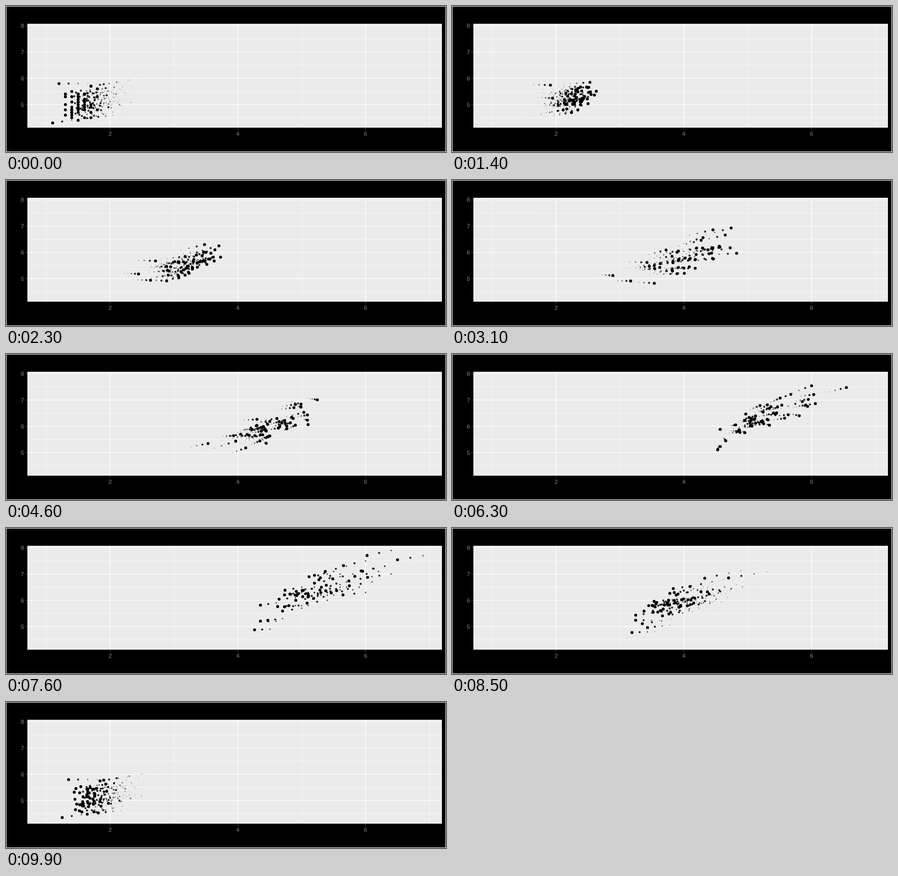
Write an HTML page with a canvas that moves like this. It is 864 by 288 pixels and loops after 10000 ms.

```html
<!DOCTYPE html>
<html lang="en">
<head>
<meta charset="utf-8">
<title>Iris states</title>
<style>
html, body { margin: 0; width: 100%; height: 100%; overflow: hidden; background: #000; }
canvas { display: block; }
</style>
</head>
<body>
<canvas id="plot" width="864" height="288"></canvas>
<script>
// Petal length (x) and sepal length (y) per species: mean, spread, correlation
const species = [
  { x: 1.47, y: 4.97, sx: 0.16, sy: 0.32, r: 0.3 },
  { x: 4.28, y: 5.93, sx: 0.4, sy: 0.46, r: 0.72 },
  { x: 5.5, y: 6.53, sx: 0.46, sy: 0.52, r: 0.82 }
];

// Outer flowers, one [x, y] per species; the rest are drawn at random
const outliers = [
  [[1.4, 5.1], [4.7, 7], [6, 6.3]],
  [[1.4, 4.6], [4.7, 6.3], [4.5, 4.9]],
  [[1.5, 5], [3.3, 4.9], [6.3, 7.3]],
  [[1.1, 4.3], [4.7, 6.1], [5, 5.7]],
  [[1.2, 5.8], [3.6, 5.6], [5.1, 5.8]],
  [[1.7, 5.7], [4.5, 6.2], [6.9, 7.7]],
  [[1.5, 5.4], [3.7, 5.5], [6.4, 7.9]],
  [[1.4, 5.5], [5.1, 6], [5.1, 6.3]],
  [[1.5, 5.3], [3, 5.1], [5.4, 6.2]]
];

let seed = 11;
function random() {
  seed = (seed * 48271) % 2147483647;
  return seed / 2147483647;
}

function normal() {
  const z = Math.sqrt(-2 * Math.log(random())) * Math.cos(2 * Math.PI * random());
  return Math.max(-1.9, Math.min(1.9, z));
}

const tenth = v => Math.round(v * 10) / 10;

function sample(s) {
  const a = normal();
  const b = s.r * a + Math.sqrt(1 - s.r * s.r) * normal();
  return [tenth(s.x + s.sx * a), tenth(s.y + s.sy * b)];
}

const flowers = outliers.slice();
while (flowers.length < 50) flowers.push(species.map(sample));

// Each move runs linearly between two steps of the loop
const STEPS = 100, STEP_MS = 100, WAKE = 5;
const moves = [
  { from: 0, to: 1, start: 6, end: 33 },
  { from: 1, to: 2, start: 40, end: 67 },
  { from: 2, to: 0, start: 74, end: 100 }
];

const panel = { left: 42, top: 35, right: 856, bottom: 240 };
const px = v => panel.left + (v - 0.705) * (panel.right - panel.left) / 6.49;
const py = v => panel.bottom - (v - 4.12) * (panel.bottom - panel.top) / 3.96;
const ctx = document.getElementById('plot').getContext('2d');

function line(x1, y1, x2, y2, color, width) {
  ctx.strokeStyle = color;
  ctx.lineWidth = width;
  ctx.beginPath();
  ctx.moveTo(x1, y1);
  ctx.lineTo(x2, y2);
  ctx.stroke();
}

const vLine = (v, w) => line(px(v), panel.top, px(v), panel.bottom, '#fff', w);
const hLine = (v, w) => line(panel.left, py(v), panel.right, py(v), '#fff', w);

function label(text, x, y, align) {
  ctx.textAlign = align;
  ctx.fillStyle = ctx.strokeStyle = '#5a5a5a';
  ctx.lineWidth = 0.5;
  ctx.fillText(text, x, y);
  ctx.strokeText(text, x, y);
}

function drawPlot() {
  ctx.fillStyle = '#fff';
  ctx.fillRect(0, 0, 864, 288);
  ctx.fillStyle = '#000';
  ctx.fillRect(1, 1, 862, 286);
  ctx.fillStyle = '#ebebeb';
  ctx.fillRect(panel.left, panel.top, panel.right - panel.left, panel.bottom - panel.top);

  [1, 3, 5, 7].forEach(v => vLine(v, 0.6));
  [4.5, 5.5, 6.5, 7.5].forEach(v => hLine(v, 0.6));
  const xTicks = [2, 4, 6], yTicks = [5, 6, 7, 8];
  xTicks.forEach(v => vLine(v, 1.3));
  yTicks.forEach(v => hLine(v, 1.3));

  ctx.font = '11.7px "Liberation Sans", Arial, sans-serif';
  for (const v of xTicks) {
    line(px(v), panel.bottom, px(v), panel.bottom + 3.65, '#444', 1.3);
    label(v, px(v), 256.2, 'center');
  }
  for (const v of yTicks) {
    line(panel.left - 3.65, py(v), panel.left, py(v), '#444', 1.3);
    label(v, 35.4, py(v) + 4.2, 'right');
  }
}

function drawPoints(step, radius, alpha) {
  const { from, to, start, end } = moves.find(m => step < m.end);
  const t = Math.max(0, (step - start) / (end - start));
  ctx.fillStyle = `rgba(0,0,0,${alpha})`;
  for (const stops of flowers) {
    const [x, y] = stops[from].map((v, k) => v + (stops[to][k] - v) * t);
    ctx.beginPath();
    ctx.arc(px(x), py(y), radius, 0, 2 * Math.PI);
    ctx.fill();
  }
}

function draw(step) {
  drawPlot();
  // The wake shrinks and fades with age
  for (let age = WAKE; age >= 0; age--) {
    const f = 1 - age / (WAKE + 1);
    const alpha = 1 - (1 - f ** 2.5) ** 2;
    drawPoints((step - age + STEPS) % STEPS, 0.8 + 2.1 * f ** 3, alpha);
  }
}

const begin = performance.now();
function tick() {
  draw(Math.floor((performance.now() - begin) / STEP_MS) % STEPS);
  requestAnimationFrame(tick);
}
tick();
</script>
</body>
</html>
```
